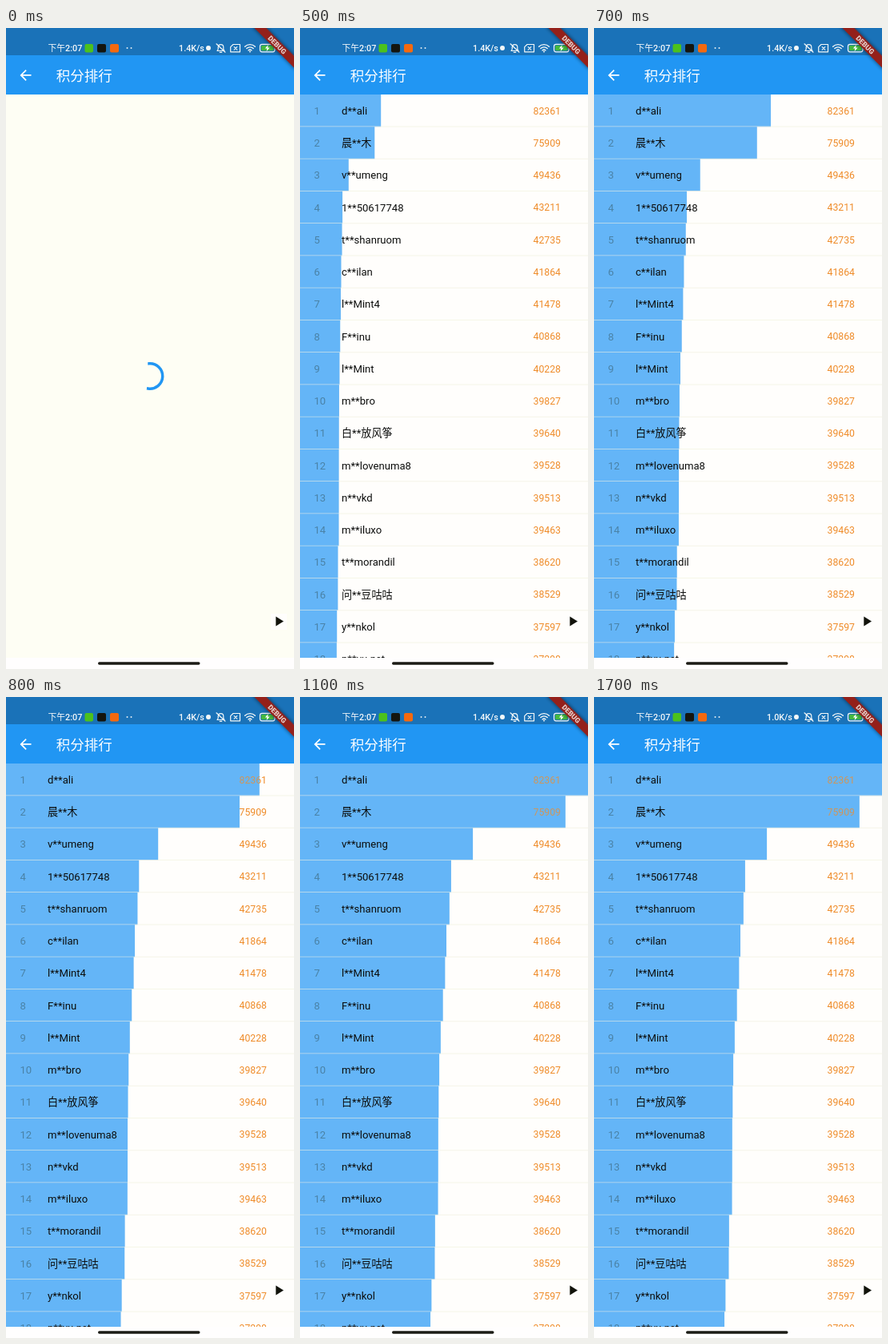
These frames come from a looping animation (360x800 px, 1800 ms). An HTML page:

```html
<!DOCTYPE html>
<html lang="zh-CN">
<head>
<meta charset="utf-8">
<title>积分排行</title>
<style>
html, body { margin: 0; width: 100%; height: 100%; overflow: hidden; background: #fff; }
svg { display: block; width: 360px; height: 800px; }
text { font-family: Roboto, "Noto Sans CJK SC", "Noto Sans CJK", sans-serif; white-space: pre; }
.status { font-size: 10.8px; font-weight: 500; fill: #f4f8fa; }
.title { font-size: 17.5px; fill: #fff; }
.rank { font-size: 13.1px; fill: #4a82a6; }
.name { font-size: 13.1px; fill: #0c0d0c; }
.score { font-size: 12.25px; fill: #ef8c2a; }
.line { fill: none; stroke: #f2f7f8; stroke-width: 1.2; stroke-linecap: round; stroke-linejoin: round; }
.banner { filter: drop-shadow(0 0 2.5px rgba(0, 0, 0, .6)); }
</style>
</head>
<body>
<svg viewBox="0 0 360 800" xmlns="http://www.w3.org/2000/svg">
  <defs><clipPath id="page"><rect y="83" width="360" height="703"/></clipPath></defs>
  <rect width="360" height="800" fill="#fffefe"/>

  <g id="loading">
    <rect y="83" width="360" height="703" fill="#fefef4"/>
    <rect x="331" y="731" width="20" height="20" fill="#fffefc"/>
    <path id="arc" fill="none" stroke="#2196f3" stroke-width="3.5" stroke-linecap="square"/>
  </g>
  <g id="list" clip-path="url(#page)"><rect y="83" width="360" height="703" fill="#fffefc"/></g>

  <rect width="360" height="34" fill="#1a72b8"/>
  <rect y="34" width="360" height="49" fill="#2196f3"/>
  <path transform="translate(14 48.4) scale(.876)" fill="#fff"
    d="M20 11H7.83l5.59-5.59L12 4l-8 8 8 8 1.41-1.41L7.83 13H20z"/>
  <text class="title" x="62.8" y="66">积分排行</text>

  <text class="status" x="52.5" y="29">下午2:07</text>
  <rect x="98.5" y="20" width="10.5" height="10.5" rx="2" fill="#4cc11c"/>
  <rect x="114" y="20" width="11" height="10.5" rx="2" fill="#14150f"/>
  <rect x="130" y="20" width="11" height="10.5" rx="2" fill="#f4690f"/>
  <g fill="#e4eef4"><circle cx="151.5" cy="25" r="1"/><circle cx="156.5" cy="25" r="1"/></g>
  <text class="status" id="speed" x="216" y="29"></text>
  <circle cx="253" cy="25" r="3" fill="#f2f7f8"/>
  <g class="line">
    <path d="M264 28.5h9l-1.2-2v-2.5a3.3 3.3 0 0 0-6.6 0v2.5zM267.3 30.4h2.4M263 19.8l11 10.4"/>
    <path d="M284 20.5h8.5v9.3h-11.8v-6.2zM285.2 23.6l3.6 3.6M288.8 23.6l-3.6 3.6"/>
    <path d="M298.6 23.2a9.2 9.2 0 0 1 12.8 0M300.8 25.6a6 6 0 0 1 8.4 0M303 27.9a3 3 0 0 1 4 0" stroke-width="1.4"/>
    <rect x="317.5" y="20.3" width="18.5" height="9.5" rx="2.5"/>
    <path d="M338 23.8v2.6"/>
  </g>
  <circle cx="305" cy="29.5" r="1" fill="#f2f7f8"/>
  <rect x="319" y="21.8" width="15.5" height="6.5" rx="1.2" fill="#45b840"/>
  <path d="M327.8 21l-4 4.6h2.6l-.8 3.6 4-4.7h-2.6z" fill="#fff"/>

  <g transform="translate(360 0) rotate(45)">
    <rect class="banner" x="-38" y="24.5" width="76" height="10.5" fill="#94201a"/>
    <text y="32.9" text-anchor="middle" font-size="8.9" font-weight="900" fill="#e6cfca">DEBUG</text>
  </g>

  <path d="M337.3 734.5v12l9.7-6z" fill="#12130b"/>
  <rect x="115" y="791.3" width="127.5" height="3.4" rx="1.7" fill="#1c1c16"/>
</svg>
<script>
const LOOP = 1800, STEP = 100, LIST_AT = 500, SPEED_AT = 1300;
const TOP = 83, ROW = 40.25, BEST = 82361;
const GROWTH = [.281, .447, .614, .88, 1];
const rows = [
  ['d**ali', 82361], ['晨**木', 75909], ['v**umeng', 49436], ['1**50617748', 43211],
  ['t**shanruom', 42735], ['c**ilan', 41864], ['l**Mint4', 41478], ['F**inu', 40868],
  ['l**Mint', 40228], ['m**bro', 39827], ['白**放风筝', 39640], ['m**lovenuma8', 39528],
  ['n**vkd', 39513], ['m**iluxo', 39463], ['t**morandil', 38620], ['问**豆咕咕', 38529],
  ['y**nkol', 37597], ['p**vu.net', 37298]
];
const $ = id => document.getElementById(id);
const list = $('list'), loading = $('loading'), arc = $('arc'), speed = $('speed');

function add(tag, attrs, text) {
  const el = document.createElementNS('http://www.w3.org/2000/svg', tag);
  for (const key in attrs) el.setAttribute(key, attrs[key]);
  if (text !== undefined) el.textContent = text;
  return list.appendChild(el);
}

const bars = [];
rows.forEach(([name, score], i) => {
  const top = TOP + i * ROW, y = top + 24.8;
  const bar = opacity => bars.push({
    full: 360 * score / BEST,
    el: add('rect', { y: top, height: ROW, fill: '#64b5f6', opacity })
  });
  bar(1);
  add('text', { class: 'score', x: 291.5, y: y - .3 }, score);
  bar(.25); // dims the score where the bar reaches it
  add('rect', { y: top + 39.6, width: 360, height: .9, fill: '#f3f2e2', opacity: .85 });
  add('text', { class: 'rank', x: 17.5, y }, i + 1);
  add('text', { class: 'name', x: 52, y }, name);
});

// cubic-bezier(.4, 0, .2, 1)
function fastOutSlowIn(x) {
  if (x >= 1) return 1;
  let lo = 0, hi = 1;
  for (let i = 0; i < 20; i++) {
    const s = (lo + hi) / 2, r = 1 - s;
    if (1.2 * r * r * s + .6 * r * s * s + s ** 3 < x) lo = s; else hi = s;
  }
  return lo * lo * (3 - 2 * lo);
}

function drawSpinner(t) {
  const R = 15.75, age = t * .82;
  const from = -93.6 + age * 360 / 2222;
  const sweep = 270 * fastOutSlowIn((303 + age) / 667);
  const point = deg => {
    const a = deg * Math.PI / 180;
    return `${180 + R * Math.cos(a)} ${434.5 + R * Math.sin(a)}`;
  };
  arc.setAttribute('d', `M${point(from)}A${R} ${R} 0 ${+(sweep > 180)} 1 ${point(from + sweep)}`);
}

function render(t) {
  const ready = t >= LIST_AT;
  loading.style.display = ready ? 'none' : '';
  list.style.display = ready ? '' : 'none';
  speed.textContent = t < SPEED_AT ? '1.4K/s' : '1.0K/s';
  if (!ready) return drawSpinner(t);
  const grown = GROWTH[Math.min((t - LIST_AT) / STEP, GROWTH.length - 1)];
  for (const { el, full } of bars) el.setAttribute('width', full * grown);
}

const start = performance.now();
function tick() {
  const t = (performance.now() - start) % LOOP;
  render(Math.floor(t / STEP) * STEP);
  requestAnimationFrame(tick);
}
tick();
</script>
</body>
</html>
```
